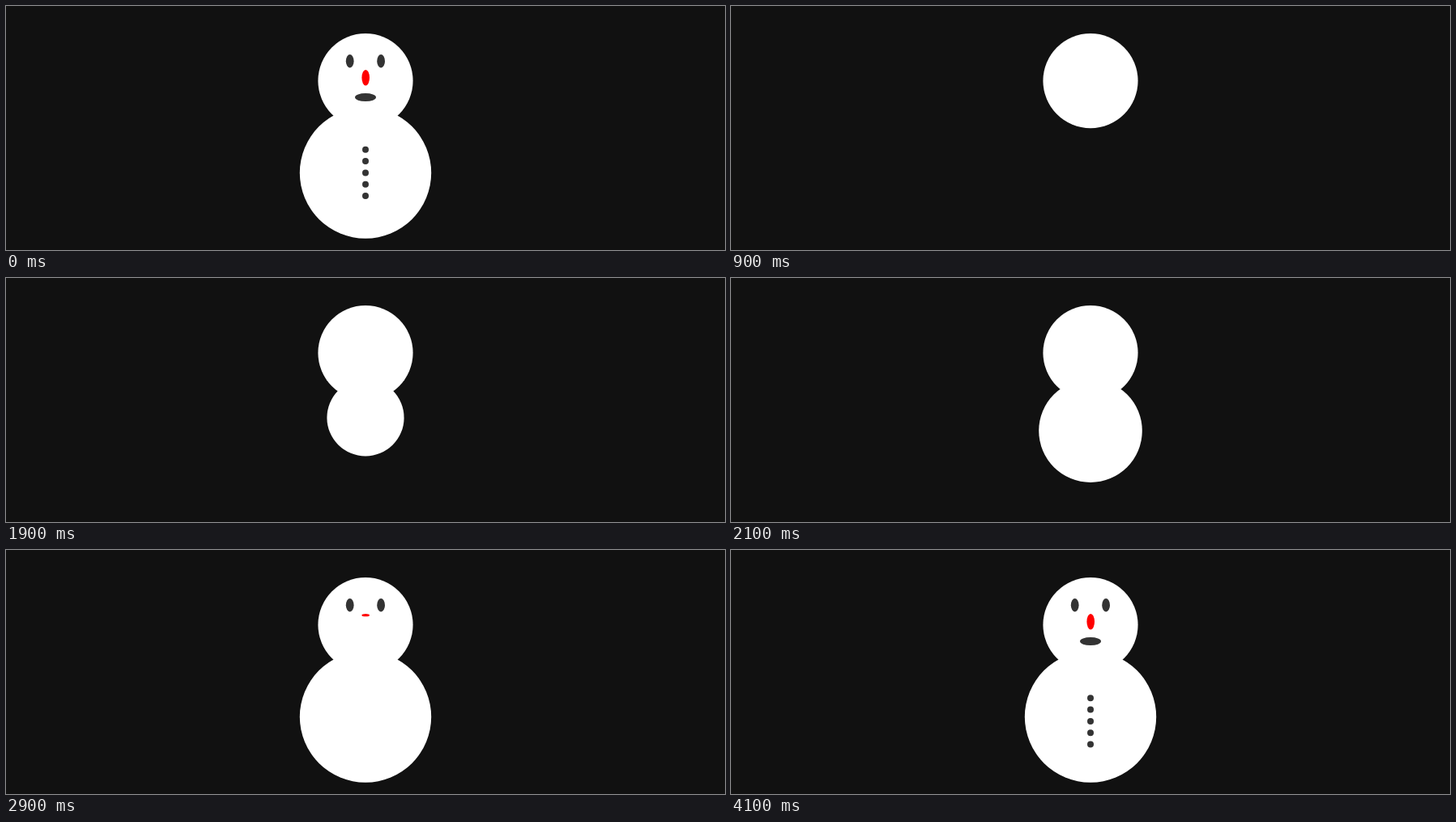
These frames come from a looping animation (888 px wide and 302 px high, 4200 ms). An HTML page:

```html
<!DOCTYPE html>
<html lang="en">
<head>
<meta charset="utf-8">
<title>Snowman</title>
<style>
  html, body { margin: 0; width: 100%; height: 100%; overflow: hidden; background: #111; }
  svg { display: block; width: 888px; height: 302px; }
</style>
</head>
<body>
<svg viewBox="0 0 888 302" fill="#333">
  <circle cx="444" cy="92.6" r="58.6" fill="#fff"/>
  <circle id="body" cx="444" fill="#fff"/>
  <ellipse id="eyeL" cx="424.7" cy="68.2" rx="4.9"/>
  <ellipse id="eyeR" cx="463.1" cy="68.2" rx="4.9"/>
  <ellipse id="nose" cx="444.2" rx="4.8" fill="#f00"/>
  <ellipse id="mouth" cx="444" rx="13"/>
  <g id="buttons"></g>
</svg>
<script>
const LOOP = 4200, STEP = 100, RESTART = 900;
const BODY_R = 81.2, BODY_TOP = 125.3;
const part = id => document.getElementById(id);
const set = (id, attrs) => {
  for (const name in attrs) part(id).setAttribute(name, attrs[name]);
};
// Grows downwards from a fixed top edge
const growDown = (id, top, ry) => set(id, { cy: top + ry, ry });

part('buttons').innerHTML = [0, 1, 2, 3, 4]
  .map(i => `<circle cx="444" cy="${177.7 + 14.35 * i}" r="4"/>`).join('');

function draw(t) {
  // The finished snowman rests until the build restarts
  const progress = (start, length) =>
    t < RESTART ? 1 : Math.min(1, Math.max(0, (t - start) / length));

  const r = BODY_R * progress(1314, 1000);
  set('body', { cy: BODY_TOP + r, r });

  const ry = 8.2 * progress(2314, 500);
  set('eyeL', { ry });
  set('eyeR', { ry });

  growDown('nose', 79, 9.75 * progress(2814, 500));
  growDown('mouth', 108.1, 5 * progress(3314, 500));

  const slide = progress(3814, 500);
  set('buttons', {
    transform: `translate(0 ${t < RESTART ? 0 : 12.85 * (1 - slide)})`,
    visibility: slide > 0 ? 'visible' : 'hidden'
  });
}

const begin = performance.now();
function tick() {
  const t = (performance.now() - begin) % LOOP;
  draw(Math.floor(t / STEP) * STEP);
  requestAnimationFrame(tick);
}
tick();
</script>
</body>
</html>
```
